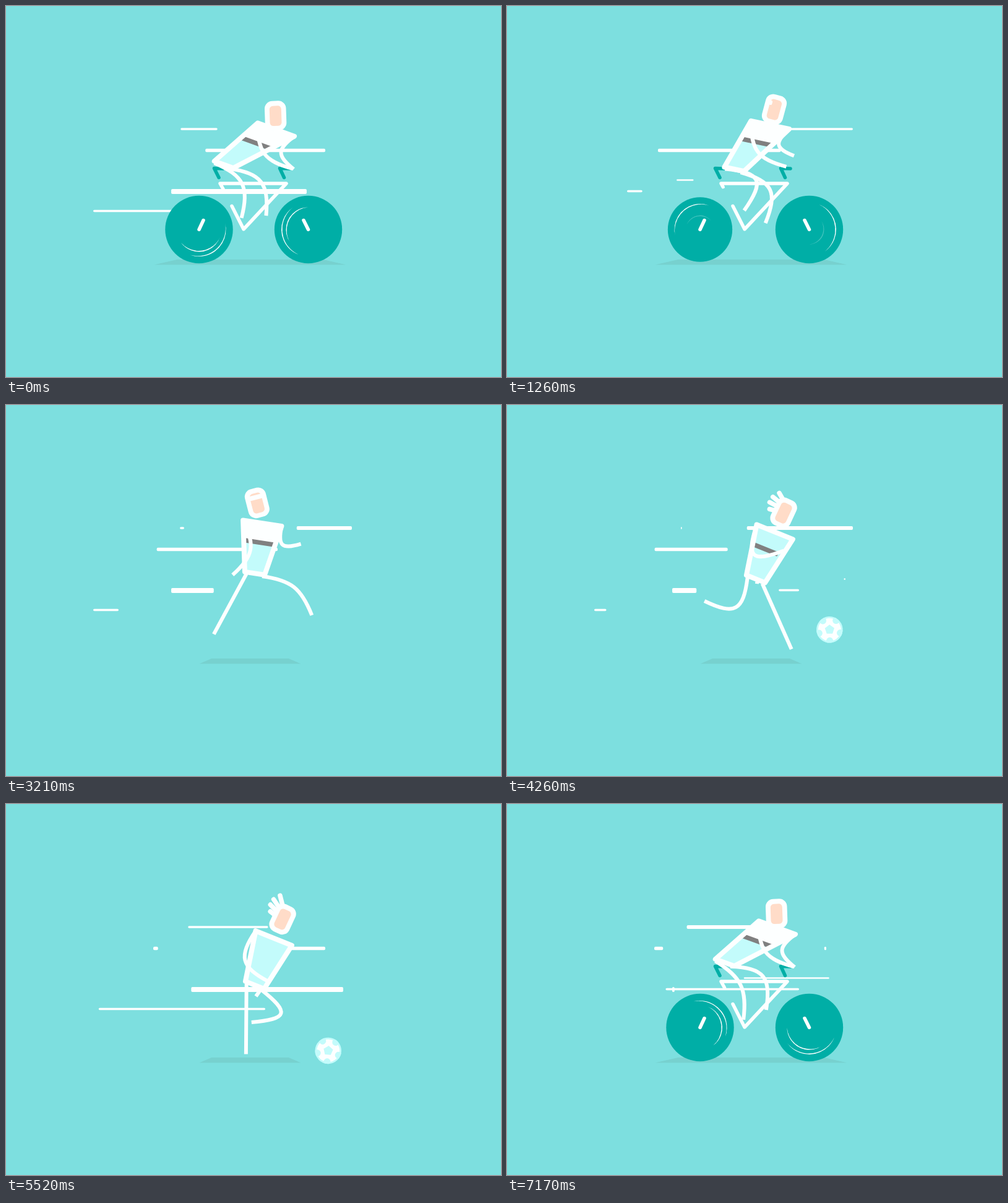
These frames come from a looping animation (800x600 px, 7.2 s). An HTML page with a canvas:

```html
<!DOCTYPE html>
<html lang="en">
<head>
<meta charset="utf-8">
<title>Ride, run, play</title>
<style>
html, body { margin: 0; width: 100%; height: 100%; overflow: hidden; background: #7ddfdf; }
canvas { display: block; }
</style>
</head>
<body>
<canvas id="stage" width="800" height="600"></canvas>
<script>
const ctx = document.getElementById('stage').getContext('2d');
const WHITE = '#fdffff', TEAL = '#00aea6', ICE = '#c3fbfb', SKIN = '#ffdcc8', BG = '#7ddfdf';
const LOOP = 7200, STRIDE = 480, TAU = Math.PI * 2, DEG = Math.PI / 180;
const { sin, cos, hypot } = Math;

const clamp = (x, a = 0, b = 1) => Math.max(a, Math.min(b, x));
const ramp = (t, a, b) => clamp((t - a) / (b - a));
const smooth = x => x * x * (3 - 2 * x);
const swell = (t, a, b) => smooth(ramp(t, a, b));
const pulse = (t, a, b, c, d) => swell(t, a, b) * (1 - swell(t, c, d));
const lerp = (a, b, k) => a + (b - a) * k;
const mix = (a, b, k) => a.map((v, i) => lerp(v, b[i], k));

// The wind rises and falls: time and number of line cycles passed
const wind = [[0, .63], [1260, 2.2875], [2100, 3.4625], [3210, 4.79], [4260, 5.8475], [5520, 7.5275], [7200, 10.045]];
// Speed lines: y, width, left end, start of head and tail in the cycle, their durations
const lines = [
  [199, 3.5, 281, .2, .426, .516],
  [199, 6, 281, .745, .912, .38],
  [233.5, 5.5, 238, 0, .25, .4],
  [233.5, 5.5, 238, .5, .75, .4],
  [281.5, 2.5, 269, .847, .982, .6],
  [300, 8, 267, .465, .59, .54, .125],
  [299.5, 3.5, 194, .831, 1.048, .435],
  [331.5, 3.5, 141, .464, .555, .5, .095]
];

// Ends of the limbs, from hip or shoulder, over one stride
const foot = a => [
  59 * cos(a) - 47 * sin(a) - 11 * cos(2 * a) - 8.6 * sin(2 * a),
  78.7 + 27 * cos(a) + 23.4 * sin(a) - 6.7 * cos(2 * a) + 4.3 * sin(2 * a) + 6.8 * cos(3 * a)
];
const hand = a => [
  13.6 - 5 * cos(a) + 24 * sin(a) + 9.4 * cos(2 * a),
  71.5 + 2.5 * cos(a) - 31.4 * sin(a) + 19 * cos(2 * a)
];
const pedal = a => [400.5 + 20 * cos(a), 341 + 20 * sin(a)];

// Two bones of equal length, drawn as one rounded stroke
function limb([x, y], [ex, ey], bone, bend, limit = 80) {
  const d = hypot(ex, ey);
  const out = bend / d * Math.min(limit, 1.45 * Math.sqrt(Math.max(0, bone * bone - d * d / 4)));
  const kx = ex / 2 + ey * out, ky = ey / 2 - ex * out;
  ctx.beginPath();
  ctx.moveTo(x, y);
  ctx.bezierCurveTo(x + kx * .8, y + ky * .8, x + lerp(ex, kx, .8), y + lerp(ey, ky, .8), x + ex, y + ey);
  ctx.lineCap = 'butt';
  ctx.lineWidth = 6;
  ctx.strokeStyle = WHITE;
  ctx.stroke();
}

function shape(points) {
  ctx.beginPath();
  points.forEach(p => ctx.lineTo(...p));
  ctx.closePath();
}

function poly(points, fill) {
  shape(points);
  ctx.fillStyle = fill;
  ctx.fill();
}

function box(x, y, w, h, r, fill) {
  ctx.beginPath();
  ctx.roundRect(x, y, w, h, r);
  ctx.fillStyle = fill;
  ctx.fill();
}

function disc(x, y, r, fill) {
  ctx.beginPath();
  ctx.arc(x, y, r, 0, TAU);
  ctx.fillStyle = fill;
  ctx.fill();
}

// Polyline of which only the share k is drawn
function trim(points, width, color, k) {
  if (k <= 0) return;
  let length = 0;
  ctx.beginPath();
  points.forEach((p, i) => {
    ctx.lineTo(...p);
    if (i) length += hypot(p[0] - points[i - 1][0], p[1] - points[i - 1][1]);
  });
  ctx.setLineDash([length * k, length * 2]);
  ctx.lineCap = ctx.lineJoin = 'round';
  ctx.lineWidth = width;
  ctx.strokeStyle = color;
  ctx.stroke();
  ctx.setLineDash([]);
}

function speedLines(t) {
  const i = wind.findIndex(k => k[0] > t);
  const [a, b] = [wind[i - 1], wind[i]];
  const c = lerp(a[1], b[1], ramp(t, a[0], b[0])) % 1;
  const travel = x => 278 * (1 - (1 - clamp(x)) ** 3);
  for (const [y, w, left, start, stop, slow, fast = slow] of lines) {
    for (const now of [c, c + 1]) {
      const head = travel((now - start) / fast), tail = travel((now - stop) / slow);
      if (head - tail > .5) box(left + 278 - head, y - w / 2, head - tail, w, Math.min(2, w / 2), WHITE);
    }
  }
}

function crescent(r, turn, alpha) {
  const a = 1.08, d = 3, x = r * cos(a), y = r * sin(a);
  const b = Math.atan2(y, x + d);
  ctx.save();
  ctx.rotate(turn);
  ctx.globalAlpha = alpha;
  ctx.beginPath();
  ctx.arc(0, 0, r, -a, a);
  ctx.arc(-d, 0, hypot(x + d, y), b, -b, true);
  ctx.fillStyle = WHITE;
  ctx.fill();
  ctx.restore();
}

function wheel(x, size, start, t) {
  if (size <= 0) return;
  const fade = ramp(t, 1150, 1260) - ramp(t, 6600, 6750);
  const turn = start + t / 120 * TAU;
  ctx.save();
  ctx.translate(x, 361.5);
  ctx.scale(size, size);
  disc(0, 0, 54.7, TEAL);
  crescent(43.5, turn, 1);
  crescent(36 - 12 * fade, turn + .6, 1 - .75 * fade);
  ctx.restore();
}

function bicycle(t) {
  const grow = delay => t < 3000 ? 1 - ramp(t, 1220 + delay, 1410 + delay) ** 2
    : 1 - (1 - ramp(t, 6430 + delay, 6660 + delay)) ** 2;
  const gear = grow(40);
  trim([[351, 263], [336.5, 262.5], [344, 277.5]], 5.5, TEAL, gear);
  trim([[458, 263], [442.5, 262.5], [449.5, 277.5]], 5.5, TEAL, gear);
  trim([[365, 323.5], [384, 361], [453, 287], [346, 287], [351.5, 297]], 5.5, WHITE, grow(15));
  wheel(312, grow(0), .78, t);
  wheel(488.5, gear, 2.97, t);
  trim([[319, 346.5], [312, 361.5]], 5.5, WHITE, gear);
  trim([[481, 346.5], [488.5, 361.5]], 5.5, WHITE, gear);
}

// Drops in, bounces at the feet, then is shot away backwards
function ball(t) {
  if (t < 3900 || t > 6040) return;
  const drop = ramp(t, 3900, 4290), shot = ramp(t, 5890, 6040);
  const hop = sin(ramp(t, 4290, 5890) * 4 * Math.PI) ** 2;
  ctx.save();
  ctx.translate(588 - 72 * drop + 82 * hop - 547 * shot, -25 + 428 * drop ** 1.26 - 70 * hop - 350 * shot);
  ctx.rotate(.3 + 2 * hop - 8 * shot);
  disc(0, 0, 21.3, ICE);
  ctx.clip();
  disc(0, 0, 18.5, WHITE);
  const at = (i, r) => [r * cos(i * TAU / 5), r * sin(i * TAU / 5)];
  for (let i = 0; i < 5; i++) disc(...at(i, 18), 5.5, ICE);
  poly([0, 1, 2, 3, 4].map(i => at(i + .5, 8)), ICE);
  ctx.restore();
}

function torso(at, t) {
  const strip = (v0, v1, u) => [at(0, v0), at(u, v0), at(u, v1), at(0, v1)];
  const plain = pulse(t, 3800, 4150, 6200, 6500), band = 1 - pulse(t, 4200, 4460, 6250, 6550);
  poly(strip(0, 1, 1), ICE);
  if (plain < 1) poly(strip(0, .36 * (1 - plain), 1), WHITE);
  if (band > 0) poly(strip(.34, .43, band), '#808080');
  shape(strip(0, 1, 1));
  ctx.lineJoin = 'round';
  ctx.lineWidth = 8;
  ctx.strokeStyle = WHITE;
  ctx.stroke();
}

function head(x, y, tilt, t, stride) {
  const hair = pulse(t, 3900, 4180, 6200, 6480), sweatband = pulse(t, 1225, 1340, 3900, 4150);
  ctx.save();
  ctx.translate(x, y);
  ctx.rotate(tilt);
  for (let i = 0; i < 4 && hair > 0; i++) {
    const root = [-7, -17 + i * 6];
    const tip = [-28 + 4 * (i - 1.7) ** 2 * .7, -30 + 10 * i + 4 * cos(stride)];
    trim([root, mix(root, tip, hair)], 7.5, WHITE, 1);
  }
  box(-17.3, -24, 34.6, 48, 12.5, WHITE);
  box(-9.5, -16, 19, 32.5, 5.5, SKIN);
  if (sweatband > 0) box(-11, -13, 22 * sweatband, 7.5, 2, WHITE);
  ctx.restore();
}

function draw(t) {
  const stride = (t - 4260) / STRIDE * TAU;
  const ride = 1 - pulse(t, 1140, 1470, 6250, 6650);
  const grip = clamp(ride * 1.5);
  const play = swell(t, 3800, 4200), nod = swell(t, 2900, 4200);

  // Torso: a trapezium standing on the hips, leaned and sheared
  const bob = 12 * cos(2 * stride - Math.PI / 2) * (1 - ride);
  const hipX = lerp(402, 352, ride), hipY = lerp(281, 256.5, ride) + bob;
  const lean = lerp(-6 + 28 * swell(t, 2100, 4260), 20, ride) * DEG;
  const at = (u, v) => {
    const x = (u - .5) * lerp(63, 32.5, v) + 60 * ride * (1 - v), y = -82 * (1 - v);
    return [hipX + x * cos(lean) - y * sin(lean), hipY + x * sin(lean) + y * cos(lean)];
  };
  const tilt = (lerp(-21 + 46 * nod, -2, ride) + 28 * sin(ride * Math.PI)) * DEG;
  const neck = lerp(34, 22.5, ride), [topX, topY] = at(.5, 0);

  ctx.fillStyle = BG;
  ctx.fillRect(0, 0, 800, 600);
  const half = lerp(57 + 25 * swell(t, 2100, 3100), 155, grip);
  poly([[-1, 418.5], [-.76, 410], [.76, 410], [1, 418.5]].map(([x, y]) => [394.5 + x * half, y]), '#77d1cf');
  speedLines(t);
  bicycle(t);
  ball(t);

  const leg = (u, turn, crank) => {
    const [x, y] = at(u, 1.035), [px, py] = pedal(crank);
    limb([x, y], mix(foot(turn), [px - x, py - y], grip), lerp(55, 57.5, grip), 1);
  };
  const crank = (174 + t * .6) * DEG;
  const frontHand = mix(mix(hand(stride + Math.PI), [-58, 78 - 6 * cos(stride)], play), [-1, 53], ride);
  const backHand = mix(mix(hand(stride), [30 + 14 * cos(stride), 65.4 - 23.4 * cos(stride)], play), [57, 74], grip);
  limb(at(1, 0), frontHand, 50, -1, 35);
  leg(.08, stride + Math.PI, crank);
  leg(.9, stride, crank + Math.PI);
  torso(at, t);
  limb(at(0, 0), backHand, 53, -clamp(backHand[0] / 20, -1, 1));
  head(topX + neck * sin(tilt), topY - neck * cos(tilt), tilt, t, stride);
}

const start = performance.now();
function tick() {
  draw((performance.now() - start) % LOOP);
  requestAnimationFrame(tick);
}
tick();
</script>
</body>
</html>
```
